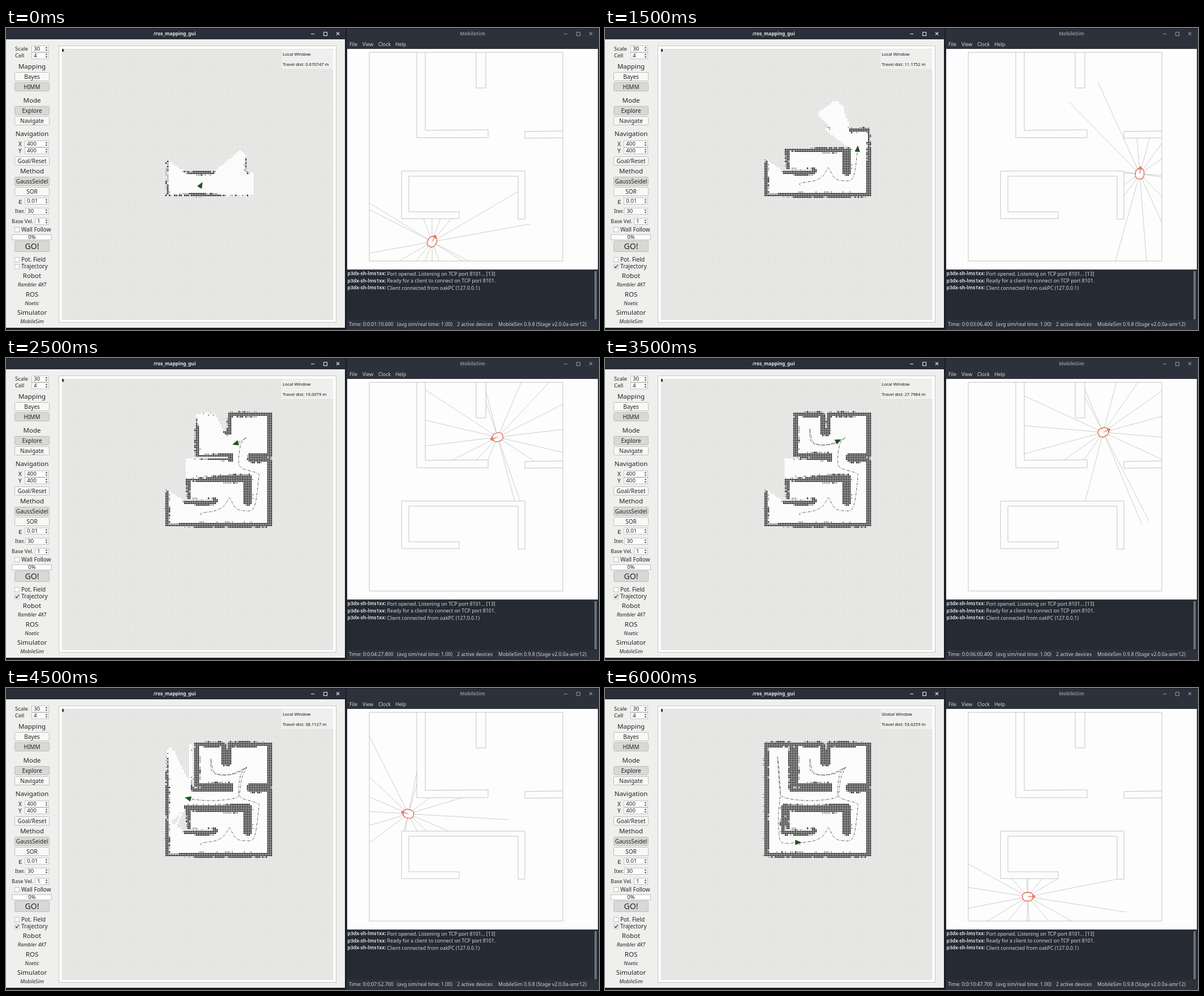
An HTML page with a canvas for the animation above (6500 ms loop, 1048 by 534 pixels).

```html
<!DOCTYPE html>
<html lang="en">
<head>
<meta charset="utf-8">
<title>Robot mapping</title>
<style>
html, body { margin: 0; width: 100%; height: 100%; overflow: hidden; background: #1b1e24; }
canvas { display: block; width: 1048px; height: 534px; }
</style>
</head>
<body>
<canvas id="stage" width="1048" height="534"></canvas>
<script>
const stage = document.getElementById('stage');
const c = stage.getContext('2d');
const STEP = 500, CELL = 3, GRID = 160, GX = 99, GY = 37;
const RANGE = 177, SCALE = .532, RAD = Math.PI / 180, SAMPLES = 16;
const FONT = '"Noto Sans", "Open Sans", sans-serif';

// Walls of the simulated room
const room = [
  [642,43, 984,43, 984,412, 642,412, 642,43],
  [726,43, 726,194, 852,194, 852,180, 741,181, 741,43],
  [831,43, 831,106, 848,106, 848,43],
  [984,182, 917,183, 917,195, 984,194],
  [699,253, 917,253, 917,338, 905,338, 905,262, 712,262, 712,325, 801,325, 801,337, 699,337, 699,253]
];
// Key points of the drive; the robot turns on the spot between legs
const legs = [
  [753,378, 757,371, 802,363, 830,347, 845,323],
  [845,323, 850,322, 868,353, 895,363, 930,352, 945,258, 941,239, 887,220, 879,190, 887,140, 906,119],
  [906,119, 869,140, 820,145, 790,132, 786,90],
  [786,90, 800,137, 849,143, 906,119],
  [906,119, 889,156, 882,203, 865,222, 783,230, 700,219, 687,190, 683,147, 679,85],
  [679,85, 683,117, 688,203, 682,278, 684,340, 695,370, 747,369]
];
// Key points passed at each step
const stops = [0, 4, 7.5, 9, 12, 15, 18, 20.5, 23, 25.8, 30, 32, 35];
const readings = {
  step: [0, 1, 3, 5, 8, 10, 12],
  metres: [.670747, 4.42757, 11.1752, 19.0079, 32.1936, 44.0317, 53.6259],
  seconds: [70.6, 113.9, 186.4, 267.8, 406.7, 538.7, 647.7]
};
const sonar = [10, 30, 50, 88, 92.5, 130, 150, 170].flatMap(a => [a, -a]);

function reading(name, step) {
  const at = readings.step, v = readings[name];
  const i = Math.max(1, at.findIndex(s => s >= step));
  return v[i - 1] + (v[i] - v[i - 1]) * (step - at[i - 1]) / (at[i] - at[i - 1]);
}

const mapX = x => 307 + (x - 683) * SCALE;
const mapY = y => 139 + (y - 117) * SCALE;

// Catmull-Rom value and slope
function spline(a, b, d, e, t) {
  const k1 = d - a, k2 = 2 * a - 5 * b + 4 * d - e, k3 = 3 * b - a - 3 * d + e;
  return [b + (k1 * t + k2 * t * t + k3 * t * t * t) / 2, k1 / 2 + k2 * t + 1.5 * k3 * t * t];
}

function drive() {
  const out = [];
  legs.forEach((p, n) => {
    const last = p.length / 2 - 1;
    const at = (i, axis) => p[2 * Math.max(0, Math.min(last, i)) + axis];
    const add = (i, t) => {
      const [x, dx] = spline(at(i - 1, 0), at(i, 0), at(i + 1, 0), at(i + 2, 0), t);
      const [y, dy] = spline(at(i - 1, 1), at(i, 1), at(i + 1, 1), at(i + 2, 1), t);
      out.push({ x, y, a: Math.atan2(dy, dx) / RAD });
    };
    for (let i = 0; i < last; i++) for (let k = 0; k < SAMPLES; k++) add(i, k / SAMPLES);
    if (n === legs.length - 1) add(last - 1, 1);
  });
  return out;
}

function seeded(s) {
  return () => {
    s = (s + 0x6D2B79F5) | 0;
    let t = Math.imul(s ^ (s >>> 15), 1 | s);
    t = (t + Math.imul(t ^ (t >>> 7), 61 | t)) ^ t;
    return ((t ^ (t >>> 14)) >>> 0) / 4294967296;
  };
}

// Distance to the nearest wall, limited to the sonar range
function cast(x, y, angle) {
  const u = Math.cos(angle * RAD), v = Math.sin(angle * RAD);
  let best = RANGE;
  for (const w of room) for (let i = 0; i + 3 < w.length; i += 2) {
    const a = w[i] - x, b = w[i + 1] - y, d = w[i + 2] - w[i], e = w[i + 3] - w[i + 1];
    const det = u * e - v * d;
    if (!det) continue;
    const t = (a * e - b * d) / det, s = (a * v - b * u) / det;
    if (t > 0 && s >= 0 && s <= 1) best = Math.min(best, t);
  }
  return best;
}

// Drives the route once and keeps the grid as it stands at each step:
// 0 unknown, 1 free, 2 doubtful, 3 occupied
function explore(route) {
  const seen = new Uint8Array(GRID * GRID), hits = new Uint16Array(GRID * GRID);
  const rnd = seeded(11);
  const cell = (x, y) => Math.floor((y - GY) / CELL) * GRID + Math.floor((x - GX) / CELL);

  function scan(x, y, heading) {
    const mx = mapX(x), my = mapY(y);
    for (const s of sonar) for (let k = -8; k <= 8; k += 2) {
      const a = heading + s + k, u = Math.cos(a * RAD), v = Math.sin(a * RAD);
      const d = cast(x, y, a), end = d * SCALE;
      for (let r = 0; r < end; r += 1.5) seen[cell(mx + u * r, my + v * r)] = 1;
      if (d < RANGE) {
        const r = end + (rnd() + rnd()) * 4.5 - 5;
        hits[cell(mx + u * r, my + v * r)]++;
      }
    }
  }

  let px = 0, py = 0, pa = 0, done = 0;
  return stops.map(stop => {
    const end = Math.round(stop * SAMPLES);
    for (; done <= end; done++) {
      const { x, y, a } = route[done];
      const turn = ((a - pa + 540) % 360) - 180;
      if (Math.hypot(x - px, y - py) < 4 && Math.abs(turn) < 8) continue;
      const n = Math.max(1, Math.round(Math.abs(turn) / 10));
      for (let i = 1; i <= n; i++) scan(x, y, pa + turn * i / n);
      px = x; py = y; pa = a;
    }
    return seen.map((s, i) => hits[i] > 3 ? 3 : hits[i] > 1 ? 2 : s);
  });
}

const route = drive();
const grids = explore(route);

function box(x, y, w, h, fill, edge) {
  c.fillStyle = fill;
  c.fillRect(x, y, w, h);
  if (edge) { c.strokeStyle = edge; c.lineWidth = 1; c.strokeRect(x + .5, y + .5, w - 1, h - 1); }
}
function line(pts, color, width) {
  c.strokeStyle = color;
  c.lineWidth = width;
  c.beginPath();
  for (let i = 0; i < pts.length; i += 2) c.lineTo(pts[i], pts[i + 1]);
  c.stroke();
}
function text(s, x, y, size, color = '#222', align = 'left', style = '') {
  c.font = `${style} ${size}px ${FONT}`;
  c.fillStyle = color;
  c.textAlign = align;
  c.fillText(s, x, y + size * .35);
}
const mid = (s, y, size = 11.5, style = '') => text(s, 46, y, size, '#222', 'center', style);
const note = (s, y) => mid(s, y, 9, 'italic');

function button(s, y, pressed, h = 15, size = 10) {
  c.beginPath();
  c.roundRect(15.5, y - h / 2, 61, h, 2);
  c.fillStyle = pressed ? '#d8d8d6' : '#f8f8f7';
  c.fill();
  c.strokeStyle = '#bcbcba';
  c.lineWidth = 1;
  c.stroke();
  mid(s, y, size);
}
function spin(label, lx, value, x, y, size = 9.5) {
  text(label, lx, y, size);
  box(x, y - 6, 76 - x, 12, '#fdfdfd', '#c4c4c2');
  text(value, x + 4, y, 9.8);
  c.fillStyle = '#444';
  for (const d of [-1, 1]) {
    c.beginPath();
    c.moveTo(69.5, y + d * 1.2);
    c.lineTo(73.5, y + d * 1.2);
    c.lineTo(71.5, y + d * 3.8);
    c.fill();
  }
}
function check(s, y, on) {
  box(15, y - 4, 9, 9, '#fdfdfd', '#c0c0be');
  if (on) line([17, y, 19, y + 2.5, 22.5, y - 2.5], '#222', 1.3);
  text(s, 27, y, 10);
}
function windowButtons(x, color) {
  line([x, 10.5, x + 6, 10.5], color, 1.2);
  c.strokeRect(x + 22.5, 7.5, 6, 6);
  line([x + 45, 7.5, x + 50, 12.5], color, 1.2);
  line([x + 50, 7.5, x + 45, 12.5], color, 1.2);
}

function panel(step) {
  box(0, 1, 600, 19, '#2a2e38');
  text('/ros_mapping_gui', 298, 10, 8.5, '#e4e6ea', 'center', 'bold');
  windowButtons(539, '#d4d7dd');
  box(0, 20, 599, 510, '#eff0ee');
  spin('Scale', 16, '30', 45, 37);
  spin('Cell', 16, '4', 45, 49);
  mid('Mapping', 68);
  button('Bayes', 86);
  button('HIMM', 104, true);
  mid('Mode', 128);
  button('Explore', 146, true);
  button('Navigate', 164);
  mid('Navigation', 187);
  spin('X', 22, '400', 33, 205, 10);
  spin('Y', 22, '400', 33, 217, 10);
  button('Goal/Reset', 235);
  mid('Method', 253);
  button('GaussSeidel', 271, true);
  button('SOR', 289);
  spin('ε', 22, '0.01', 33, 306, 13);
  spin('Iter.', 16, '30', 34, 324);
  spin('Base Vel.', 10, '1', 51, 342, 9.1);
  check('Wall Follow', 356, false);
  box(10, 365, 71, 10, '#fdfdfd', '#c0c0be');
  mid('0%', 370, 9.5);
  button('GO!', 386, true, 19, 14);
  check('Pot. Field', 409, false);
  check('Trajectory', 421.5, step > 0);
  mid('Robot', 438);
  note('Rambler 4KT', 454);
  mid('ROS', 471);
  note('Noetic', 486.5);
  mid('Simulator', 503);
  note('MobileSim', 519);
  box(93, 31, 491, 490, '#fdfdfd', '#c6c6c4');
}

function map(step, pose) {
  box(GX, GY, 479, 479, '#f2f2f1');
  grids[step].forEach((state, i) => {
    const x = GX + i % GRID * CELL, y = GY + Math.floor(i / GRID) * CELL;
    if (state) box(x - .5, y - .5, CELL, CELL, '#fdfdfd');
    if (state === 0) box(x, y, 2, 2, '#d7d7d5');
    if (state === 2) box(x, y, 2, 2, '#8c8c8c');
    if (state === 3) box(x - .25, y - .25, 2.5, 2.5, '#1c1c1c');
  });
  box(99, 37, 3, 5, '#1d4a20');
  box(487, 38, 91, 35, '#eff0ee');
  text(step === 12 ? 'Global Window' : 'Local Window', 489, 46.5, 7.6, '#111');
  text(`Travel dist: ${reading('metres', step).toPrecision(6)} m`, 489, 64.5, 7.6, '#111');

  if (step > 0) {
    const driven = route.slice(0, Math.round(stops[step] * SAMPLES) + 1);
    c.setLineDash([4, 2, 1, 2]);
    line(driven.flatMap(p => [mapX(p.x), mapY(p.y)]), '#333', .9);
    c.setLineDash([]);
  }
  c.save();
  c.translate(mapX(pose.x), mapY(pose.y));
  c.rotate(pose.a * RAD);
  c.beginPath();
  c.moveTo(5.5, 0);
  c.lineTo(-4.5, 4.2);
  c.lineTo(-4.5, -4.2);
  c.closePath();
  c.fillStyle = '#1c5520';
  c.fill();
  c.strokeStyle = '#143a16';
  c.lineWidth = .6;
  c.stroke();
  c.restore();
}

function simulator(step, { x, y, a }) {
  box(602, 1, 446, 533, '#2d313b');
  text('MobileSim', 824.5, 10.5, 8.5, '#878c97', 'center', 'bold');
  windowButtons(986, '#868b95');
  [['File', 607], ['View', 630], ['Clock', 658], ['Help', 688]].forEach(m => text(m[0], m[1], 28.5, 8.8, '#d3d6dc'));
  box(603, 37, 443, 390, '#fdfdfd');
  for (const w of room) line(w, '#bebebe', .9);
  for (const s of sonar) {
    const d = cast(x, y, a + s), t = (a + s) * RAD;
    line([x, y, x + Math.cos(t) * d, y + Math.sin(t) * d], '#bcbcbc', .75);
  }

  c.save();
  c.translate(x, y);
  c.rotate(a * RAD);
  c.beginPath();
  for (const [sx, sy] of [[-1, -1], [1, -1], [1, 1], [-1, 1]]) {
    const corner = [[9 * sx, 4 * sy], [4.5 * sx, 7.5 * sy]];
    if (sx !== sy) corner.reverse();
    corner.forEach(p => c.lineTo(...p));
  }
  c.closePath();
  c.fillStyle = '#fdfdfd';
  c.fill();
  c.strokeStyle = '#e2492f';
  c.lineWidth = 1.1;
  c.stroke();
  line([0, 0, 5, 0], '#777', .8);
  line([4, 0, 13, 0], '#e2492f', 1);
  line([9, -3.5, 13, 0, 9, 3.5], '#e2492f', 1);
  c.restore();

  box(602, 429, 446, 87, '#262a33');
  box(1040, 430, 4, 85, '#6b707b');
  ['Port opened. Listening on TCP port 8101... [13]',
    'Ready for a client to connect on TCP port 8101.',
    'Client connected from oakPC (127.0.0.1)'].forEach((s, i) => {
    const ly = 434.5 + i * 12.5;
    text('p3dx-sh-lms1xx:', 603.5, ly, 8.5, '#d3d6dc', 'left', 'bold');
    text(s, 673.5, ly, 8.75, '#d3d6dc');
  });
  const secs = reading('seconds', step), pad = s => s.padStart(2, '0');
  const time = `${pad(String(Math.floor(secs / 60)))}:${(secs % 60).toFixed(1).padStart(4, '0')}00`;
  [[`Time: 0:0:${time}`, 606], ['(avg sim/real time: 1.00)', 691], ['2 active devices', 797],
    ['MobileSim 0.9.8 (Stage v2.0.0a-amr12)', 870]].forEach(s => text(s[0], s[1], 523.5, 8.7, '#d3d6dc'));
}

let shown = -1;
function frame() {
  const step = Math.floor(performance.now() / STEP) % stops.length;
  if (step !== shown) {
    shown = step;
    const pose = route[Math.round(stops[step] * SAMPLES)];
    box(0, 0, 1048, 534, '#1b1e24');
    panel(step);
    map(step, pose);
    simulator(step, pose);
  }
  requestAnimationFrame(frame);
}
frame();
</script>
</body>
</html>
```
